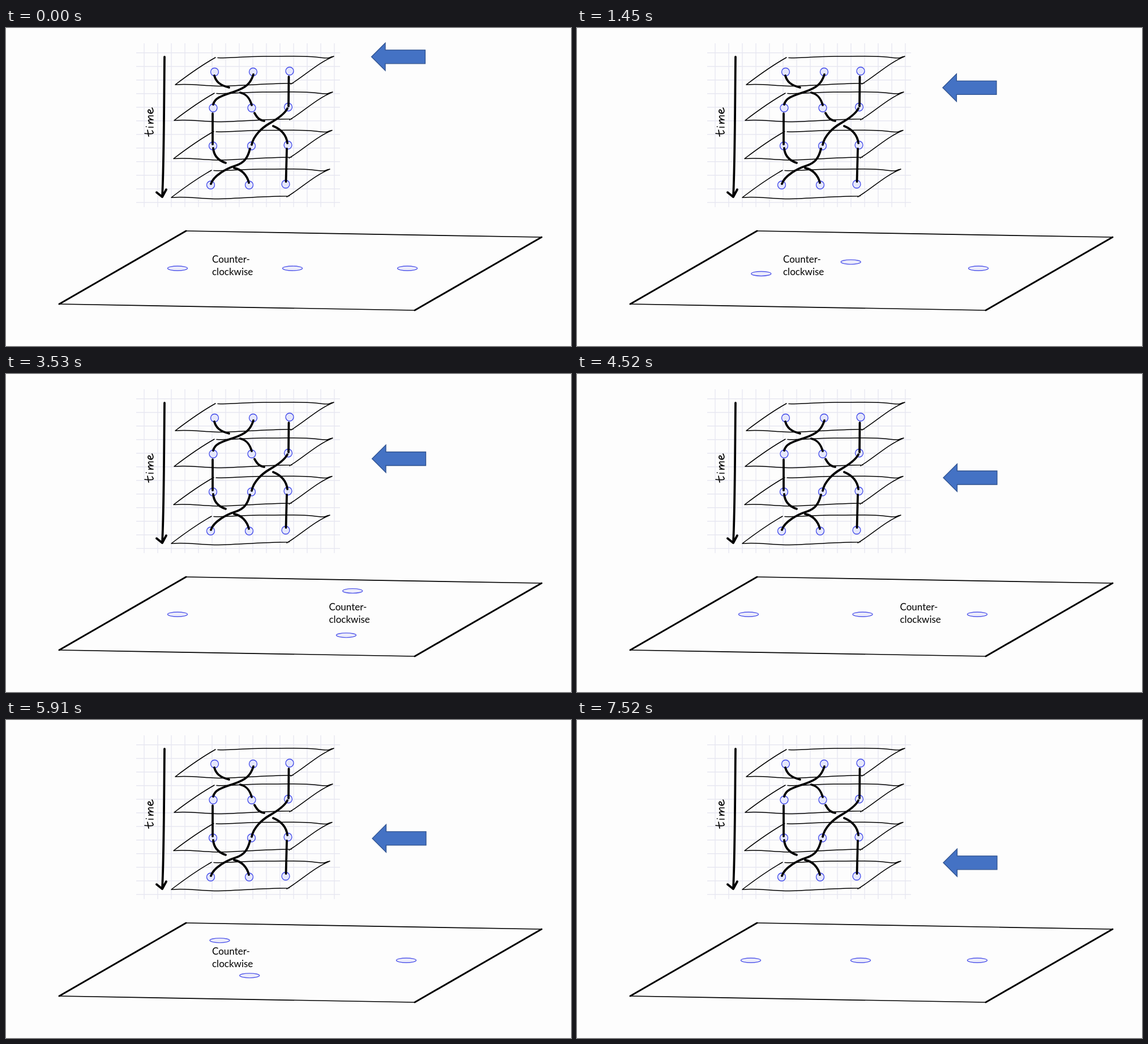
An HTML page that plays this animation: 998 px wide and 561 px high, repeating every 7550 ms.

```html
<!DOCTYPE html>
<html lang="en">
<head>
<meta charset="utf-8">
<style>
html, body { margin: 0; width: 100%; height: 100%; overflow: hidden; background: #fdfdfd; }
svg { display: block; width: 998px; height: 561px; }
path { fill: none; stroke: #000; stroke-linecap: round; stroke-linejoin: round; }
text { font: 17px Lato, Carlito, sans-serif; }
#grid { stroke: #e7e7f1; stroke-width: 1.4; stroke-linecap: butt; }
#strands { stroke-width: 3.8; }
#dots { fill: #e5e7fb; stroke: #3d46ea; stroke-width: 1.3; }
#spots { fill: #ececfb; stroke: #5258ea; stroke-width: 1.4; }
#arrow { fill: #4472c4; stroke: #2f528f; stroke-width: 1.3; stroke-linejoin: miter; }
</style>
</head>
<body>
<svg viewBox="0 0 998 561">
  <defs>
    <path id="sheet" stroke-width="1.5" d="M370 52C345 66 320 84 299 100C330 98 345 102 375 102.5S450 98 507 97.5M374 52.5C400 54 420 49.5 460 50S520 48 550 51.5 565 52 579 50C550 62 528 84 503 99"/>
  </defs>
  <path id="grid"/>
  <use href="#sheet"/>
  <use href="#sheet" x="-2" y="63"/>
  <use href="#sheet" x="-3" y="130.5"/>
  <use href="#sheet" x="-7" y="199"/>
  <g id="dots"></g>
  <path id="strands" d="M437 82C432 98 424 105 404 112S369 122 366 135
    M368 84C371 95 378 101 394 105M414 114C426 117 431 125 434 136
    M499.5 86L499 138M365 151V205
    M497 142C492 152 480 160 466 168S437 190 434 206
    M439 150C443 157 446 162 456 164M472 173C484 178 495 187 497 203
    M496 213L494.5 271
    M431 213C427 229 421 238 405 243S366 261 362 275
    M366 212C367 224 373 233 388 238M403 247C416 249 426 260 429 273
    M280 51C279 150 279 240 276 297M266 290L276 298L283 285"/>
  <!-- handwritten "time" -->
  <path stroke-width="1.7" transform="translate(260 191) rotate(-90)"
    d="M5 -15C4 -8 4 0 6 0S9 -1 10 -2M0 -8L11 -10M16 -8V0M17 -12.5V-12M23 -8V0C24 -6 28 -11 29 -7V0C30 -6 35 -11 36 -7V0M40 -4C46 -4 49 -8 45 -9S39 -3 42 -1 47 0 50 -2"/>
  <path stroke-width="1.7" d="M318 358L946 369M94 487L722 498"/>
  <path stroke-width="3" d="M318 358L94 487M946 369L722 498"/>
  <g id="spots"></g>
  <text id="label"><tspan x="0">Counter-</tspan><tspan x="0" dy="22">clockwise</tspan></text>
  <path id="arrow" d="M0 0L24.5 -24.5V-12H95V12H24.5V24.5Z"/>
</svg>
<script>
const $ = id => document.getElementById(id);
const LOOP = 7550, SWAP = 1600;
const clamp = v => Math.max(0, Math.min(1, v));
const mix = (a, b, p) => a + (b - a) * p;
const ease = u => u < .5 ? 2 * u * u : 1 - 2 * (1 - u) ** 2;

// Each swap exchanges the spots in slots i and i + 1.
const swaps = [
  { start: 226, i: 0, up: 33, down: 28, label: [364, 414] },
  { start: 2708, i: 1, up: 41.5, down: 37, label: [570.5, 416.5] },
  { start: 5217, i: 0, up: 38, down: 29, label: [364, 414.4] }
];
const slots = [[303, 506, 709], [303, 506, 709], [303, 504.5, 707], [307, 501, 707]];
const arrowY = [50.8, 112, 183, 251.8];
const arrowX = [645.5, 646, 647, 647];

let lines = "";
for (let x = 244; x < 590; x += 24) lines += `M${x} 27V316`;
for (let y = 43.7; y < 316; y += 24) lines += `M230 ${y}H590`;
$("grid").setAttribute("d", lines);

const rows = [[368.5, 77.5, 436.5, 77.5, 501, 76], [366, 141, 434, 141, 498.5, 139.5],
  [365.5, 208, 433.5, 208, 498, 206.5], [361.5, 277, 429.5, 277, 494, 275.5]];
$("dots").innerHTML = rows.map(r => [0, 2, 4].map(n =>
  `<circle cx="${r[n]}" cy="${r[n + 1]}" r="7"/>`).join("")).join("");
$("spots").innerHTML = '<ellipse rx="17.5" ry="4"/>'.repeat(3);
const spots = [...$("spots").children];
const move = (el, x, y) => el.setAttribute("transform", `translate(${x} ${y})`);

function draw(t) {
  // The next swap takes over once the previous label has faded away.
  let k = 0;
  while (k < 2 && t >= swaps[k].start + SWAP + 662) k++;
  const { start, i, up, down, label } = swaps[k];
  const p = ease(clamp((t - start) / SWAP));
  const from = slots[k], to = slots[k + 1], arc = Math.sin(Math.PI * p);

  spots.forEach((s, n) => {
    if (n === i) move(s, mix(from[i], to[i + 1], p), 424 - up * arc);
    else if (n === i + 1) move(s, mix(from[i + 1], to[i], p), 424 + down * arc);
    else move(s, from[n], 424);
  });
  move($("arrow"), mix(arrowX[k], arrowX[k + 1], p), mix(arrowY[k], arrowY[k + 1], p));

  const fadeIn = k ? clamp((t - start + 220) / 200) : 1;
  const fadeOut = clamp((start + SWAP + 662 - t) / 400);
  move($("label"), ...label);
  $("label").setAttribute("opacity", Math.min(fadeIn, fadeOut));
}

function tick() {
  draw(performance.now() % LOOP);
  requestAnimationFrame(tick);
}
tick();
</script>
</body>
</html>
```
